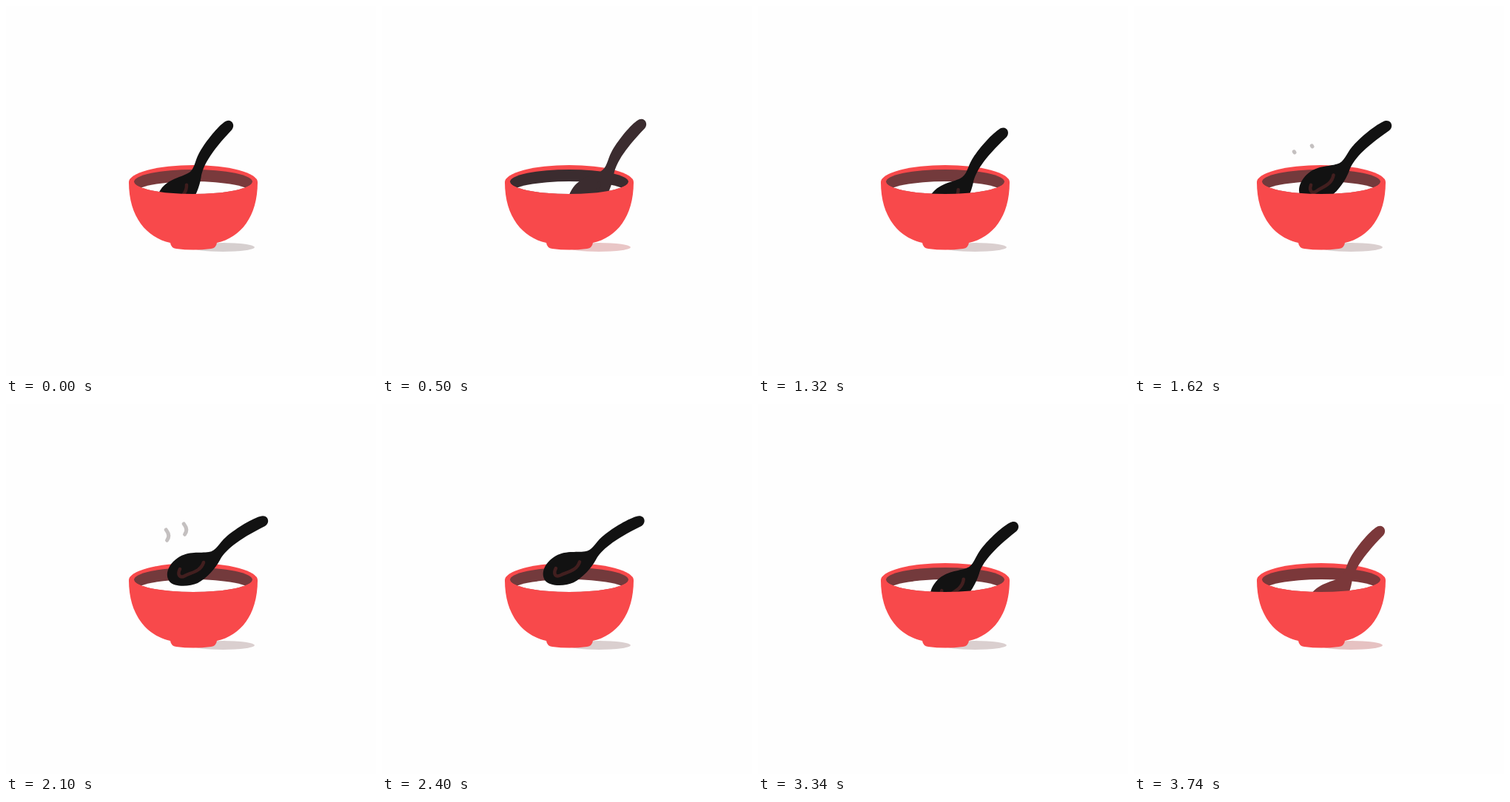
Write an HTML page that moves like this. It is 500 px wide and 500 px high and loops after 4000 ms.

```html
<!DOCTYPE html>
<html lang="en">
<head>
<meta charset="utf-8">
<title>Soup bowl</title>
<style>
  html, body { margin: 0; width: 100%; height: 100%; overflow: hidden; background: #fefefe; }
  svg { display: block; width: 100vw; height: 100vh; }
  .red { fill: #f8494b; }
  .line { fill: none; stroke-linecap: round; stroke-linejoin: round; }
</style>
</head>
<body>
<svg viewBox="0 0 500 500">
  <defs>
    <clipPath id="opening"><ellipse cx="253" cy="237.5" rx="80" ry="16.5"/></clipPath>
  </defs>
  <ellipse id="shadow" cx="293" cy="326" rx="43" ry="6"/>
  <ellipse class="red" cx="253" cy="238" rx="87" ry="23"/>
  <ellipse id="inside" cx="253" cy="237.5" rx="80" ry="16.5"/>
  <ellipse cx="253" cy="252" rx="78" ry="15" fill="#fefefe" clip-path="url(#opening)"/>
  <g id="spoon">
    <path id="body" d="M343,152 C330,156 308,170 297,180 C288,188 284,199 274,200 C262,202 247,198 232,208
      C219,217 214,231 221,240 C228,248 248,247 259,242 C272,235 283,222 289,211
      C296,198 312,184 350,165 C358,160 354,148 343,152Z"/>
    <path id="shine" class="line" stroke-width="4.5" d="M235,223 C231,231 235,236 242,232 C249,228 263,227 267,214"/>
  </g>
  <path class="red" d="M166,238 C166,285 190,313 222,320 Q223,327 230,328 Q253,331 277,328
    Q284,327 285,320 C317,313 340,285 340,238 L333,237.5 A80,16.5 0 0 1 173,237.5Z"/>
  <g id="steam" class="line" stroke="#c4c0c0" stroke-width="5">
    <path pathLength="1" d="M217,198 Q213,192 216,186 Q223,179 217,171 Q214,167 216,163"/>
    <path pathLength="1" transform="translate(24 -8)" d="M217,198 Q213,192 216,186 Q223,179 217,171 Q214,167 216,163"/>
  </g>
</svg>
<script>
const LOOP = 4000, REST = 3740;
const el = id => document.getElementById(id);

// time, handle tip x, handle tip y, counter-clockwise turn
const poses = [
  [0, 299, 162, 20], [250, 322, 159.5, 20], [500, 349, 160, 19.5], [650, 357, 163, 19],
  [1000, 338, 174, 19], [1250, 329, 173, 18], [1620, 340, 162, 8], [2100, 346, 158, 0],
  [2220, 346.5, 158, -0.5], [2860, 346.5, 158, -0.5], [3040, 346.5, 160.5, 3.5],
  [3400, 343, 167, 13], [REST, 331, 172, 19]
];

// start time, inside, spoon, shine, shadow
const tones = [
  [0, '#793a3c', '#121212', '#3d1d1d', '#d6cfcf'],
  [260, '#3b2c2f', '#3b2c2f', '#3b2c2f', '#e9c6c6'],
  [760, '#7b383a', '#7b383a', '#7b383a', '#e6c2c2'],
  [1320, '#733a3c', '#121212', '#421f1f', '#dacfcf'],
  [3420, '#7b383a', '#7b383a', '#7b383a', '#e6c2c2']
];

const secant = (i, k) => (poses[i + 1][k] - poses[i][k]) / (poses[i + 1][0] - poses[i][0]);

function slope(i, k) {
  if (i === 0) return secant(0, k);
  if (i === poses.length - 1) return secant(i - 1, k);
  const a = secant(i - 1, k), b = secant(i, k);
  return a * b > 0 ? 2 * a * b / (a + b) : 0;
}

// Monotone cubic through the poses
function poseAt(t) {
  let i = 0;
  while (i < poses.length - 2 && t >= poses[i + 1][0]) i++;
  const span = poses[i + 1][0] - poses[i][0], u = (t - poses[i][0]) / span, v = 1 - u;
  return [1, 2, 3].map(k =>
    v * v * (1 + 2 * u) * poses[i][k] + u * u * (3 - 2 * u) * poses[i + 1][k] +
    span * u * v * (v * slope(i, k) - u * slope(i + 1, k)));
}

function draw(now) {
  const t = Math.min(now % LOOP, REST);
  const [x, y, turn] = poseAt(t);
  el('spoon').setAttribute('transform', `translate(${x} ${y}) rotate(${-turn}) translate(-346 -158)`);

  const [, inside, spoon, shine, shadow] = tones.filter(tone => t >= tone[0]).pop();
  el('inside').setAttribute('fill', inside);
  el('body').setAttribute('fill', spoon);
  el('shine').setAttribute('stroke', shine);
  el('shadow').setAttribute('fill', shadow);

  const steam = el('steam');
  const head = Math.min(1, (t - 1600) / 620), tail = ((t - 1600) / 800) ** 2;
  const visible = t > 1600 && t < 2400;
  steam.style.display = visible ? '' : 'none';
  if (visible) {
    steam.setAttribute('stroke-dasharray', `${Math.max(0.001, head - tail)} 2`);
    steam.setAttribute('stroke-dashoffset', -tail);
  }
}

const start = performance.now();
function tick() {
  draw(performance.now() - start);
  requestAnimationFrame(tick);
}
tick();
</script>
</body>
</html>
```
